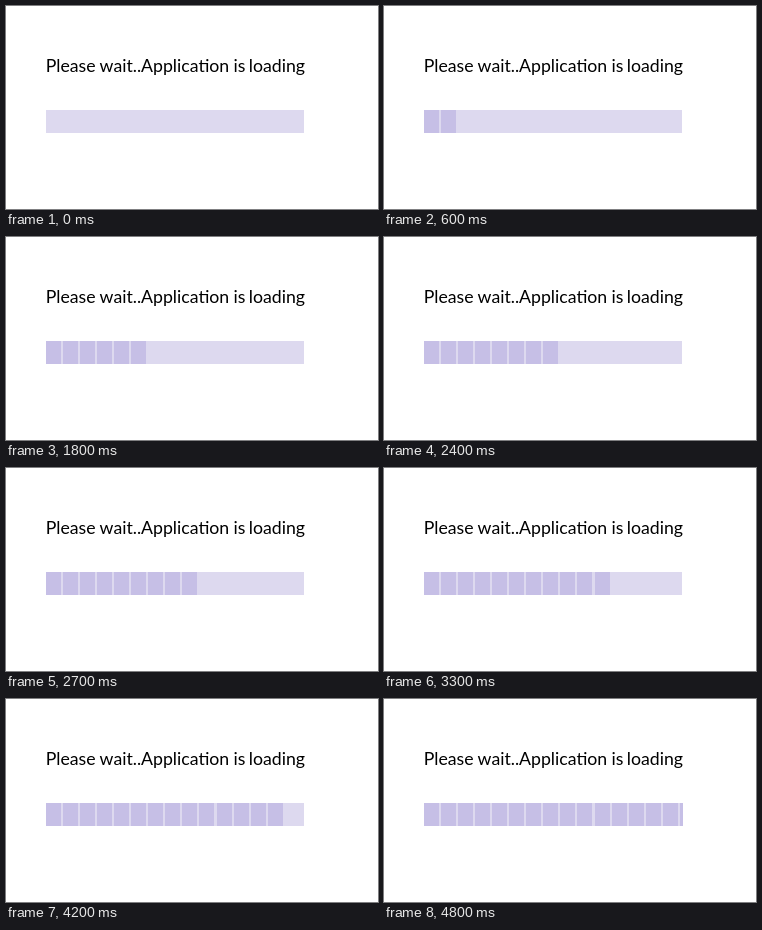
An HTML page for the animation above (5.1 s loop, 372 by 203 pixels).

```html
<!DOCTYPE html>
<html lang="en">
<head>
<meta charset="utf-8">
<title>Loading</title>
<style>
  html, body { margin: 0; width: 100%; height: 100%; overflow: hidden; background: #fff; }
  svg { display: block; }
  text { font: 17.7px Lato, "Open Sans", sans-serif; fill: #000; }
</style>
</head>
<body>
<svg width="372" height="203" viewBox="0 0 372 203" shape-rendering="crispEdges">
  <text y="66"><tspan x="39.7">Please </tspan><tspan x="93.6">wait..Application </tspan><tspan x="227.6">is </tspan><tspan x="242.8">loading</tspan></text>
  <rect x="40" y="104" width="258" height="23" fill="#ddd9ef"/>
  <path id="blocks" fill="#c6bfe6"/>
</svg>
<script>
  const STEP = 300, LOOP = 5100, PITCH = 17.1;
  const LEFT = 40, RIGHT = 299, BLOCK = 15;
  const blocks = document.getElementById('blocks');

  function block(_, i) {
    const x = LEFT + Math.floor(i * PITCH);
    return `M${x} 104H${Math.min(x + BLOCK, RIGHT)}V127H${x}Z`;
  }

  function draw() {
    const count = Math.floor(performance.now() % LOOP / STEP);
    blocks.setAttribute('d', Array.from({ length: count }, block).join(''));
    requestAnimationFrame(draw);
  }
  draw();
</script>
</body>
</html>
```
